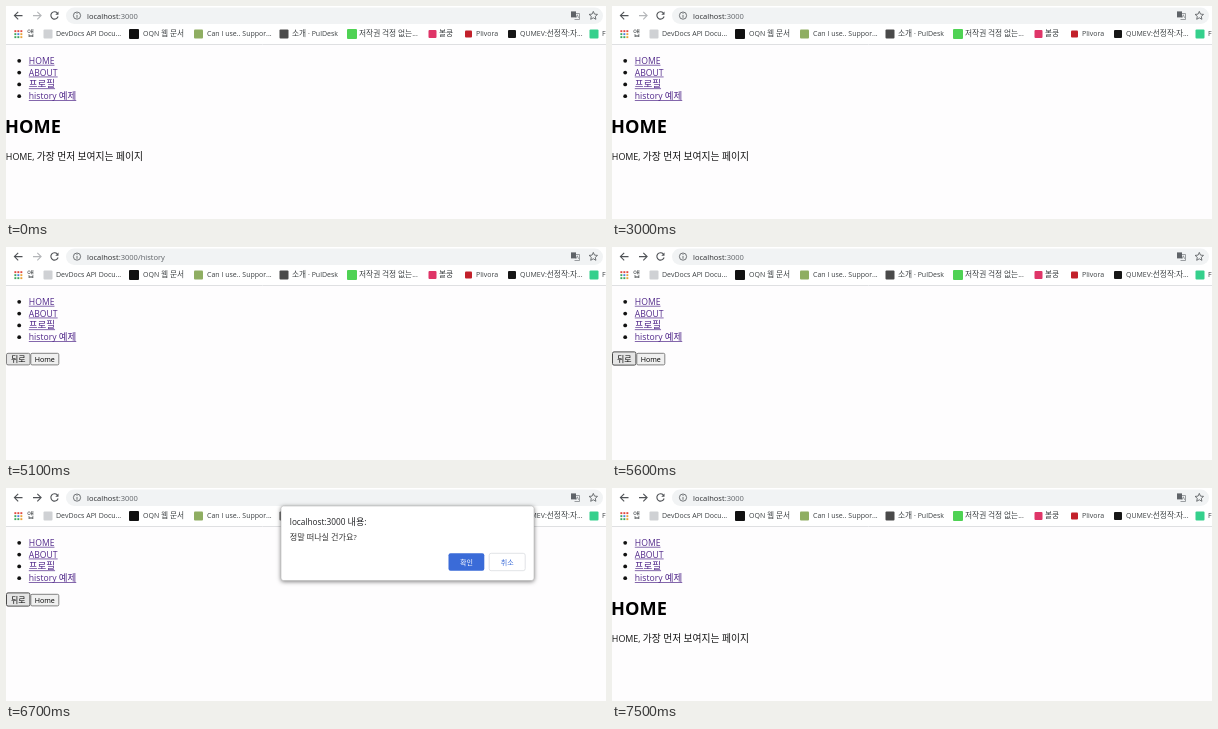
Animation, 600 px wide and 213 px high, one loop 8000 ms. Source, as an HTML page:

```html
<!DOCTYPE html>
<html lang="ko">
<head>
<meta charset="utf-8">
<style>
  html, body { margin: 0; width: 100%; height: 100%; overflow: hidden; background: #fefdfe; }
  svg { display: block; }
  text { font-family: "Open Sans", "Noto Sans CJK KR", sans-serif; white-space: pre; }
  .ko { font-family: "Noto Sans CJK KR", "Noto Sans CJK", sans-serif; font-size: 1.1em; }
  .icon { fill: none; stroke: #505357; stroke-width: 1.1; }
</style>
</head>
<body>
<svg id="stage" width="600" height="213" viewBox="0 0 600 213">
  <rect width="600" height="38" fill="#fff"/>
  <path d="M0 38.5H600" stroke="#dfe0e2"/>
  <g class="icon">
    <path d="M16.5 9.6H8.4M12.2 5.8L8.4 9.6L12.2 13.4"/>
    <path id="forward" d="M27 9.6H35.1M31.3 5.8L35.1 9.6L31.3 13.4"/>
    <path d="M51.3 6.9A3.7 3.7 0 1 0 52.1 10.5"/>
    <path d="M52.5 5.5V8.7H49.3Z" fill="#505357" stroke="none"/>
  </g>
  <rect x="60" y="1.5" width="537" height="16.5" rx="8.2" fill="#f1f3f4"/>
  <g class="icon" style="stroke-width:.8">
    <circle cx="71" cy="9.6" r="3.6"/>
    <path d="M71 9V11.8M71 7.2V8.1"/>
    <path d="M587.3 5.4l1.2 2.7 3 .3-2.2 2 .6 2.9-2.6-1.5-2.6 1.5.6-2.9-2.2-2 3-.3z"/>
    <path d="M569.5 7.5H573.5V13.5H568.5" stroke="#85888c"/>
    <path d="M570 11.8L571.3 8.8L572.6 11.8" stroke="#85888c"/>
    <rect x="565" y="5.4" width="5" height="6" fill="#5f6368" stroke="none"/>
  </g>
  <text id="url" x="81" y="12.6" font-size="7.55" fill="#5f6368"><tspan fill="#2c2e31">localhost</tspan>:3000<tspan id="path"></tspan></text>
  <g id="bookmarks"></g>
  <g id="links"></g>
  <g id="home"></g>
  <g id="history">
    <rect id="back" rx="1.5"/>
    <rect x="24.8" y="106.3" width="28" height="11.6" rx="1.3" fill="#f0f0f0" stroke="#666" stroke-width=".8"/>
  </g>
  <g id="dialog">
    <rect x="275" y="18" width="253" height="74.5" rx="2.5" fill="#fff" stroke="#b9b9b9" stroke-width=".6"
      style="filter:drop-shadow(0 1px 2px rgba(0,0,0,.5))"/>
    <rect id="ring" x="441.4" y="64.4" width="38" height="19.2" rx="2.6" fill="#b5c9f3"/>
    <rect x="442.5" y="65.3" width="35.8" height="17.4" rx="2" fill="#3a6bd8"/>
    <rect x="483.2" y="65.3" width="36" height="17.4" rx="2" fill="#fff" stroke="#dadce0" stroke-width=".8"/>
  </g>
</svg>
<script>
const $ = id => document.getElementById(id);

function set(el, attrs) {
  for (const key in attrs) el.setAttribute(key, attrs[key]);
  return el;
}

const add = (parent, tag, attrs) =>
  parent.appendChild(set(document.createElementNS('http://www.w3.org/2000/svg', tag), attrs));

function label(parent, x, y, size, text, attrs = { fill: '#111' }) {
  const el = add(parent, 'text', { x, y, 'font-size': size, ...attrs });
  el.innerHTML = text.replace(/[가-힣]+/g, '<tspan class="ko">$&</tspan>');
  return el;
}

// Apps grid
const [red, amber, green, blue] = ['#e0483e', '#e8a33a', '#3ca55c', '#4a7fe0'];
[red, red, red, green, blue, amber, green, green, amber].forEach((fill, i) =>
  add($('bookmarks'), 'rect', {
    x: 8.4 + i % 3 * 3, y: 24.2 + Math.floor(i / 3) * 3, width: 1.9, height: 1.9, fill
  }));
label($('bookmarks'), 21, 30.4, 7, '앱', { fill: '#3c4043' });

// Bookmarks: icon x, icon size, color, text x, title
[
  [37.5, 9, '#cfd1d4', 50, 'DevDocs API Docu...'],
  [123, 10, '#111', 137, 'OQN 웹 문서'],
  [188, 9, '#8fae62', 201, 'Can I use.. Suppor...'],
  [273.5, 9, '#4a4a4a', 286, '소개 · PulDesk'],
  [341, 10, '#4fd254', 353, '저작권 걱정 없는...'],
  [422.5, 8, '#df3568', 433, '볼쿵'],
  [459, 7, '#c2202a', 470, 'Plivora'],
  [502, 8, '#161616', 514, 'QUMEV:선정작:자...'],
  [583.5, 9, '#35d08c', 596, 'F']
].forEach(([x, size, fill, textX, title]) => {
  add($('bookmarks'), 'rect', { x, y: 28 - size / 2, width: size, height: size, rx: 1, fill });
  label($('bookmarks'), textX, 30.4, 7, title, { fill: '#3c4043' });
});

const links = ['HOME', 'ABOUT', '프로필', 'history 예제'].map((title, i) => {
  const y = 57.8 + i * 11.8;
  add($('links'), 'circle', { cx: 13.2, cy: y - 3, r: 1.9, fill: '#111' });
  const link = add($('links'), 'g', {});
  const text = label(link, 22.8, y, 8.65, title, {});
  add(link, 'rect', { x: 22.8, y: y + 1, width: text.getComputedTextLength(), height: .7 });
  return link;
});

label($('home'), -.9, 127, 18.2, 'HOME', { 'font-weight': 700, fill: '#000' });
label($('home'), -.2, 153.7, 8.92, 'HOME, 가장 먼저 보여지는 페이지');

const centered = fill => ({ 'text-anchor': 'middle', fill });
label($('history'), 12.3, 114.9, 7.2, '뒤로', centered('#000'));
label($('history'), 38.8, 114.8, 7.1, 'Home', { ...centered('#000'), 'font-weight': 500 });

label($('dialog'), 283.8, 37, 8.25, 'localhost:3000 내용:', { fill: '#202124' });
label($('dialog'), 283.8, 52.4, 7.4, '정말 떠나실 건가요?', { fill: '#333' });
label($('dialog'), 460.4, 76.6, 6.4, '확인', centered('#fff'));
label($('dialog'), 501.2, 76.6, 6.4, '취소', centered('#3a6bd8'));

const show = (id, on) => $(id).style.display = on ? '' : 'none';

function draw(t) {
  const within = (a, b) => t >= a && t < b;
  const onHistory = within(4200, 6900);
  show('home', !onHistory);
  show('history', onHistory);
  show('dialog', within(5700, 7100));
  show('ring', t < 6400);
  $('path').textContent = within(4200, 5500) ? '/history' : '';
  $('forward').style.stroke = t < 5500 ? '#b4b6b9' : '#505357';
  links.forEach((link, i) =>
    set(link, { fill: i === 3 && within(3700, 4200) ? '#d8281c' : '#51288a' }));

  // The back button is hovered, then focused by the press
  const frame = t >= 5300
    ? { x: .5, y: 104.9, width: 23.4, height: 13.2, stroke: '#4a4a4a', 'stroke-width': 1 }
    : { x: .5, y: 106.3, width: 23.5, height: 11.6, stroke: '#666', 'stroke-width': .8 };
  set($('back'), { ...frame, fill: t >= 5100 ? '#e5e5e5' : '#f0f0f0' });
}

function loop(now) {
  draw(now % 8000);
  requestAnimationFrame(loop);
}
loop(performance.now());
</script>
</body>
</html>
```
